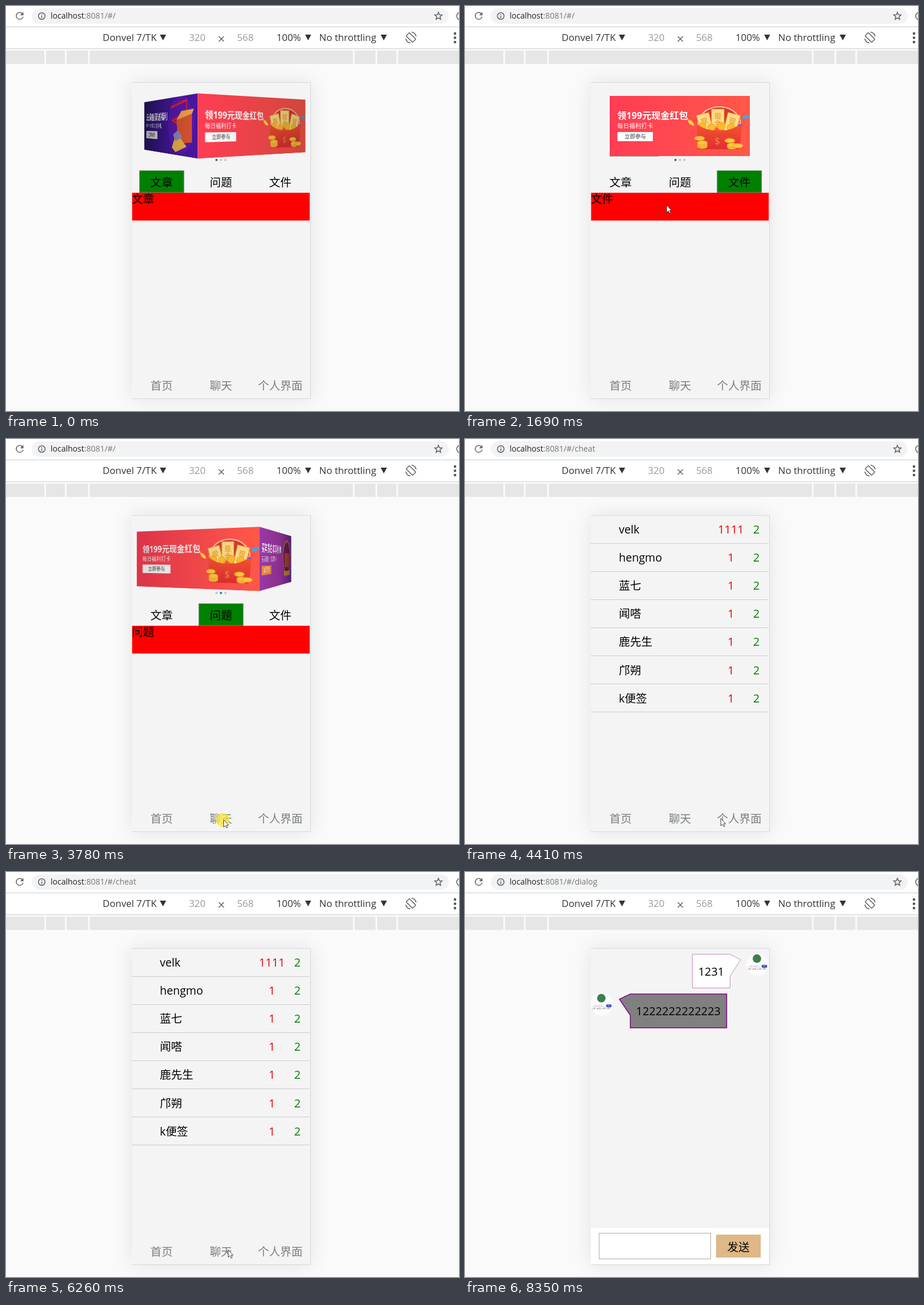
Write an HTML page that moves like this. It is 792x707 px and loops after 8.98 s.

```html
<!DOCTYPE html>
<html lang="zh-CN">
<meta charset="utf-8">
<style>
html, body { margin: 0; width: 100%; height: 100%; overflow: hidden; background: #fafafa; }
svg { position: absolute; left: 0; top: 0; display: block; }
text { font-family: "Open Sans", "Noto Sans CJK SC", "Noto Sans CJK", sans-serif; }
.bar { font-size: 16.8px; fill: #333; }
.app { font-size: 19.5px; fill: #000; }
.num { font-size: 19.9px; }
.mid { text-anchor: middle; }
.line { fill: none; stroke: #5f6368; stroke-width: 1.5; }
#phone { filter: drop-shadow(0 0 17px #00000018); }
#stage3d { position: absolute; left: 253px; top: 157px; width: 245px; height: 105px; perspective: 600px; }
#cube, .face { position: absolute; width: 245px; height: 105px; }
#cube { transform-style: preserve-3d; }
.face { backface-visibility: hidden; overflow: hidden; }
.shade { position: absolute; inset: 0; }
.face text { fill: #fff; }
</style>
<body>
<svg width="792" height="707">
  <defs>
    <g id="avatar">
      <circle r="48.5" fill="#fcfcfc"/>
      <circle cx="-1.5" cy="-27" r="18.5" fill="#3f7d4e"/>
      <text x="-32" y="8" font-size="5" fill="#c0a0b4">请输入搜索内容</text>
      <path d="M-42 9.5H13" stroke="#cf8fc0"/>
      <rect x="19" width="24.5" height="13" rx="6.5" fill="#3f51b5"/>
      <text class="mid" x="31" y="8.2" font-size="4.5" fill="#fff">搜索</text>
      <g id="radios" font-size="5" fill="#333"></g>
    </g>
  </defs>

  <!-- address bar -->
  <rect width="792" height="74" fill="#fff"/>
  <rect x="45" y="4" width="729" height="27" rx="13.5" fill="#f1f3f4"/>
  <path class="line" d="M28.6 13.4A6 6 0 1 0 29.8 18.6"/>
  <path d="M30.5 10.5V16.3H24.7Z" fill="#5f6368"/>
  <circle class="line" cx="62.5" cy="17.5" r="5.8"/>
  <path class="line" d="M62.5 16.8V21M62.5 14V15.5"/>
  <text x="78" y="22.3" font-size="14" fill="#777"><tspan fill="#222">localhost</tspan>:8081/#/<tspan id="route"></tspan></text>
  <path class="line" d="M756 11l1.8 4.3 4.6.4-3.5 3 1.1 4.5-4-2.4-4 2.4 1.1-4.5-3.5-3 4.6-.4Z"/>
  <circle class="line" cx="794.5" cy="17.5" r="6.5"/>

  <!-- device toolbar -->
  <path d="M0 36.5H792M0 74.5H792" stroke="#ccc"/>
  <g class="bar">
    <text x="169" y="61">Donvel 7/TK</text>
    <text x="320" y="61" fill="#999">320</text>
    <text x="404" y="61" fill="#999">568</text>
    <text x="473" y="61">100%</text>
    <text x="547.5" y="61">No throttling</text>
    <path d="M269 50h11l-5.5 10ZM523 50h10.5l-5.25 10ZM655 50h11l-5.5 10Z"/>
  </g>
  <path class="line" d="M372 53l9 9M381 53l-9 9"/>
  <g class="line" transform="translate(708 55)">
    <rect x="-4" y="-8" width="8" height="16" rx="1" transform="rotate(-45)"/>
    <path d="M-9 2A9.5 9.5 0 0 0-1 9.5M9-2A9.5 9.5 0 0 0 1-9.5"/>
  </g>
  <g fill="#555"><circle cx="785" cy="48" r="2.3"/><circle cx="785" cy="55.5" r="2.3"/><circle cx="785" cy="63" r="2.3"/></g>
  <path fill="#e6e6e6" d="M0 78H67V101H0ZM70 78H103V101H70ZM106 78H143.5V101H106ZM146.500 78H606.500V101H146.500ZM609.500 78H646V101H609.500ZM649 78H682.500V101H649ZM685.500 78H792V101H685.500Z"/>

  <rect id="phone" x="220" y="133" width="312" height="553" fill="#f4f4f4"/>
  <path d="M220 133.5H532.5V685.5H220" fill="none" stroke="#d8d8d8"/>

  <g id="home" class="app">
    <g id="dots"></g>
    <rect id="active" y="287.500" width="77.500" height="38" fill="green" stroke="#5c8a5c"/>
    <rect x="220.500" y="326" width="310.500" height="48.500" fill="red"/>
    <text id="content" x="220" y="344"></text>
    <g id="tabs" class="mid"></g>
  </g>

  <g id="cheat" class="app"></g>

  <g id="user" class="app">
    <use href="#avatar" x="376" y="315"/>
    <rect x="278.5" y="437.5" width="194.5" height="49" rx="9" fill="#6495ed"/>
    <text class="mid" x="375.8" y="470.5">退出</text>
  </g>

  <g id="dialog" class="app">
    <use href="#avatar" transform="translate(511 162) scale(.4)"/>
    <use href="#avatar" transform="translate(239 231) scale(.4)"/>
    <path d="M397.5 143.5H463.5L482 153L463.5 182V202.5H397.5Z" fill="#fff" stroke="#c78ac7"/>
    <path d="M457.5 213V272H289V250L270 222L289 213Z" fill="#808080" stroke="purple" stroke-width="1.5"/>
    <text class="num mid" x="430.5" y="181">1231</text>
    <text class="num mid" x="373" y="250">1222222222223</text>
    <rect x="220" y="621" width="311" height="64" fill="#fff"/>
    <rect x="234.5" y="630.5" width="195" height="45" fill="#fff" stroke="#aaa"/>
    <rect x="439" y="633" width="78" height="40" fill="#deb887"/>
    <text class="mid" x="478" y="662">发送</text>
  </g>

  <g id="footer" class="app mid"></g>
</svg>

<div id="stage3d"><div id="cube">
  <div class="face"><svg width="245" height="105">
    <linearGradient id="night"><stop stop-color="#2c1872"/><stop offset=".5" stop-color="#42189a"/><stop offset="1" stop-color="#4a16a0"/></linearGradient>
    <rect width="245" height="105" fill="url(#night)"/>
    <circle cx="180" cy="50" r="52" fill="#6a1cc0" opacity=".5"/>
    <path d="M140 18L205 8V28L150 42L190 55" fill="none" stroke="#e0202c" stroke-width="4"/>
    <path d="M165 42L225 32V80L172 84Z" fill="#d9542e"/>
    <path d="M165 42L185 26L232 24L225 32Z" fill="#f0a04a"/>
    <path d="M145 92L165 64L205 88L160 100Z" fill="#e8b04a"/>
    <path d="M150 68L172 60L190 72L160 80Z" fill="#8a86b8"/>
    <text x="13" y="40" font-size="16" font-weight="700">云朵股票送福利</text>
    <text x="13" y="56" font-size="10.5">新户专享三重好礼</text>
    <rect x="13" y="63" width="62" height="16" fill="#eee"/>
    <text class="mid" x="44" y="74.3" font-size="9.3" style="fill:#333">立即查看</text>
  </svg><div class="shade"></div></div>

  <div class="face"><svg width="245" height="105">
    <linearGradient id="warm"><stop stop-color="#ff3c54"/><stop offset="1" stop-color="#ff5848"/></linearGradient>
    <linearGradient id="pocket" x2="0" y2="1"><stop stop-color="#f4582f"/><stop offset="1" stop-color="#e02f30"/></linearGradient>
    <rect width="245" height="105" fill="url(#warm)"/>
    <text x="13" y="40" font-size="16.1" font-weight="700">领199元现金红包</text>
    <text x="13" y="56" font-size="10.5">每日福利打卡</text>
    <rect x="13.5" y="63" width="62" height="16" fill="#fff"/>
    <text class="mid" x="44.7" y="74.3" font-size="9.3" style="fill:#333">立即参与</text>
    <path d="M154 50C158 9 224 9 229 48Z" fill="#d8392c" stroke="#ffc2ae" stroke-width="2"/>
    <g id="tickets" class="mid"></g>
    <g id="coins" fill="#ffbd2e" stroke="#f09a18"></g>
    <path d="M152 48Q164 60 191 61Q218 60 231 46L228 88Q228 93 222 93H160Q154 93 154 88Z" fill="url(#pocket)"/>
    <text class="mid" x="188" y="84" font-size="17" style="fill:#f58a45">$</text>
    <g id="stacks" fill="#ffc640" stroke="#e88a20" stroke-width=".8"></g>
    <path d="M136 41Q146 42 148 52Q138 52 136 41Z" fill="#ffd23c"/>
    <path d="M231 39Q235 29 245 35Q240 42 231 39Z" fill="#42a5e0"/>
    <path d="M223 50Q228 47 233 52Q227 55 223 50Z" fill="#a050d0"/>
  </svg><div class="shade"></div></div>

  <div class="face"><svg width="245" height="105">
    <linearGradient id="plum"><stop stop-color="#9a38a8"/><stop offset=".6" stop-color="#b03cb4"/><stop offset="1" stop-color="#8a30c0"/></linearGradient>
    <rect width="245" height="105" fill="url(#plum)"/>
    <ellipse cx="200" cy="50" rx="34" ry="36" fill="#7c2460" stroke="#d07a40" stroke-width="5"/>
    <path d="M178 40H222V70H178Z" fill="#c4503c"/>
    <path d="M172 78H228V88H172Z" fill="#e09a40"/>
    <text x="13" y="40" font-size="17" font-weight="700">买年货白拿享免单</text>
    <text x="13" y="57" font-size="11">天天都有小惊喜等你</text>
    <rect x="13" y="64" width="62" height="16" fill="#f08a3c"/>
    <text class="mid" x="44" y="75.5" font-size="10">立即查看</text>
  </svg><div class="shade"></div></div>
</div></div>

<svg width="792" height="707">
  <path id="under" d="M253 262.5H339" stroke="#888" opacity=".7"/>
  <g id="cursor">
    <circle id="press" cx="-1" cy="1" r="12" fill="#ffe63c" opacity=".75"/>
    <path d="M.5.5V13.5L3.5 10.8L5.7 15L7.7 14L5.6 10H9.2Z" fill="#fff" stroke="#333" stroke-width=".9"/>
  </g>
</svg>

<script>
const LOOP = 8980, PITCH = 103.7, SPIN = 944, FIRST = -348, SECOND = 3606;
const $ = id => document.getElementById(id);
const show = (el, on) => el.style.display = on ? '' : 'none';
const fill = (id, list, draw) => $(id).innerHTML = list.map(draw).join('');
const column = i => 272 + i * PITCH;

const tabs = ['文章', '问题', '文件'];
fill('tabs', tabs, (s, i) => `<text x="${column(i)}" y="315">${s}</text>`);
fill('footer', ['首页', '聊天', '个人界面'], (s, i) => `<text x="${column(i)}" y="670" fill="#7a7f80">${s}</text>`);
fill('dots', tabs, (s, i) => `<circle cx="${368 + i * 7.8}" cy="268.7" r="2"/>`);
fill('radios', ['图片', '视频', '问答', '匿名'], (s, i) => {
  const x = -39 + i * 21;
  return `<circle cx="${x}" cy="19" r="2.5" fill="none" stroke="#444" stroke-width=".7"/>` +
    (i == 1 ? `<circle cx="${x}" cy="19" r="1.3"/>` : '') + `<text x="${x + 4}" y="21">${s}</text>`;
});
fill('cheat', ['velk', 'hengmo', '蓝七', '闻嗒', '鹿先生', '邝朔', 'k便签'], (s, i) => {
  const y = 165 + i * 49.1;
  return `<text x="269" y="${y}">${s}</text>
    <text class="num mid" x="465" y="${y}" fill="#e80000">${i ? 1 : 1111}</text>
    <text class="num mid" x="509.5" y="${y}" fill="green">2</text>
    <path d="M220 ${Math.floor(182 + i * 49.1) + .5}H531" stroke="#ccc"/>`;
});
fill('tickets', [[166, 46, -14, '现'], [214, 46, 14, '现'], [189, 38, 0, '现金']], ([x, y, turn, s]) =>
  `<g transform="translate(${x} ${y}) rotate(${turn})"><rect x="-11" y="-15" width="22" height="32" fill="#ffdc82" stroke="#e8a03c"/>` +
  [...s].map((c, i) => `<text y="${i * 13 + 2}" font-size="12" style="fill:#d98a26">${c}</text>`).join('') + '</g>');
fill('coins', [162, 178, 195, 212], (x, i) => `<circle cx="${x}" cy="${i % 2 ? 55 : 53}" r="6.5"/>`);
fill('stacks', [[157, 74], [162, 88], [162, 85], [162, 82], [210, 78], [214, 89], [214, 86], [224, 87]], ([x, y]) =>
  `<ellipse cx="${x}" cy="${y}" rx="9" ry="4"/>`);

// CSS "ease" curve, solved by bisection
function ease(x) {
  if (x <= 0 || x >= 1) return x <= 0 ? 0 : 1;
  let lo = 0, hi = 1, u;
  for (let i = 0; i < 20; i++) {
    u = (lo + hi) / 2;
    if (.75 * u * (1 - u) + u ** 3 < x) lo = u; else hi = u;
  }
  return .3 * u * (1 - u) ** 2 + 3 * u * u * (1 - u) + u ** 3;
}

// time, x, y of the pointer tip
const path = [
  [70, 656, 676], [440, 306, 378], [730, 288, 362], [900, 292, 362], [1130, 478, 306], [1210, 478, 306],
  [1370, 412, 366], [1510, 408, 364], [1690, 352, 347], [1820, 345, 346], [1960, 345, 346], [2120, 372, 308], [2260, 372, 308],
  [2850, 376, 607], [2950, 377, 620], [3250, 381, 692], [3600, 380, 664], [3940, 380, 664], [4640, 469, 661],
  [4800, 470, 663], [5150, 470, 663], [5560, 404, 656], [5720, 391, 658], [6030, 388, 659], [6260, 388, 659],
  [6950, 356, 338], [7180, 356, 339], [7260, 359, 333], [7420, 347, 350], [7980, 347, 350], [8290, 638, 663]
];
const clicks = [[1130, 1210], [2150, 2230], [3700, 3860], [4950, 5100], [6030, 6180], [7420, 7570]];
const routes = [[0, 'home'], [3860, 'cheat'], [5100, 'user'], [6180, 'cheat'], [7570, 'dialog']];
const picks = [[0, 0], [1210, 2], [2230, 1]];
const at = (list, t) => list.filter(e => e[0] <= t).pop()[1];

function pointer(t) {
  const n = Math.max(1, path.findIndex(p => p[0] >= t));
  const [t0, x0, y0] = path[n - 1], [t1, x1, y1] = path[n];
  const k = (t - t0) / (t1 - t0), s = k * k * (3 - 2 * k);
  return [x0 + (x1 - x0) * s, y0 + (y1 - y0) * s];
}

function spinCube(t) {
  const angle = 90 * (1 - ease((t - FIRST) / SPIN) - ease((t - SECOND) / SPIN));
  $('cube').style.transform = `translateZ(-122.5px) rotateY(${angle}deg)`;
  document.querySelectorAll('.face').forEach((face, i) => {
    const turn = angle + 90 * (i - 1), shade = face.lastElementChild;
    face.style.transform = `rotateY(${90 * (i - 1)}deg) translateZ(122.5px)`;
    shade.style.background = `linear-gradient(to ${turn > 0 ? 'left' : 'right'}, #0008, #0000)`;
    shade.style.opacity = Math.min(1, Math.abs(turn) / 90);
  });
  show($('under'), Math.abs(angle) < 2);
  const second = t >= SECOND;
  [...$('dots').children].forEach((dot, i) =>
    dot.style.fill = i != second ? '#c2c2c6' : second ? '#2080b0' : '#555a6c');
}

function draw(t) {
  const route = at(routes, t), pick = at(picks, t), home = route == 'home';
  for (const id of ['home', 'cheat', 'user', 'dialog']) show($(id), id == route);
  show($('footer'), route != 'dialog');
  show($('stage3d'), home);
  $('route').textContent = home ? '' : route;
  $('active').setAttribute('x', 233.5 + pick * PITCH);
  $('content').textContent = tabs[pick];
  spinCube(t);
  if (!home) show($('under'), false);

  const visible = t >= 70 && t < 8290;
  show($('cursor'), visible);
  if (visible) $('cursor').setAttribute('transform', `translate(${pointer(t)})`);
  show($('press'), clicks.some(([a, b]) => t >= a && t < b));
}

const start = performance.now();
function tick() {
  draw((performance.now() - start) % LOOP);
  requestAnimationFrame(tick);
}
tick();
</script>
</body>
</html>
```
